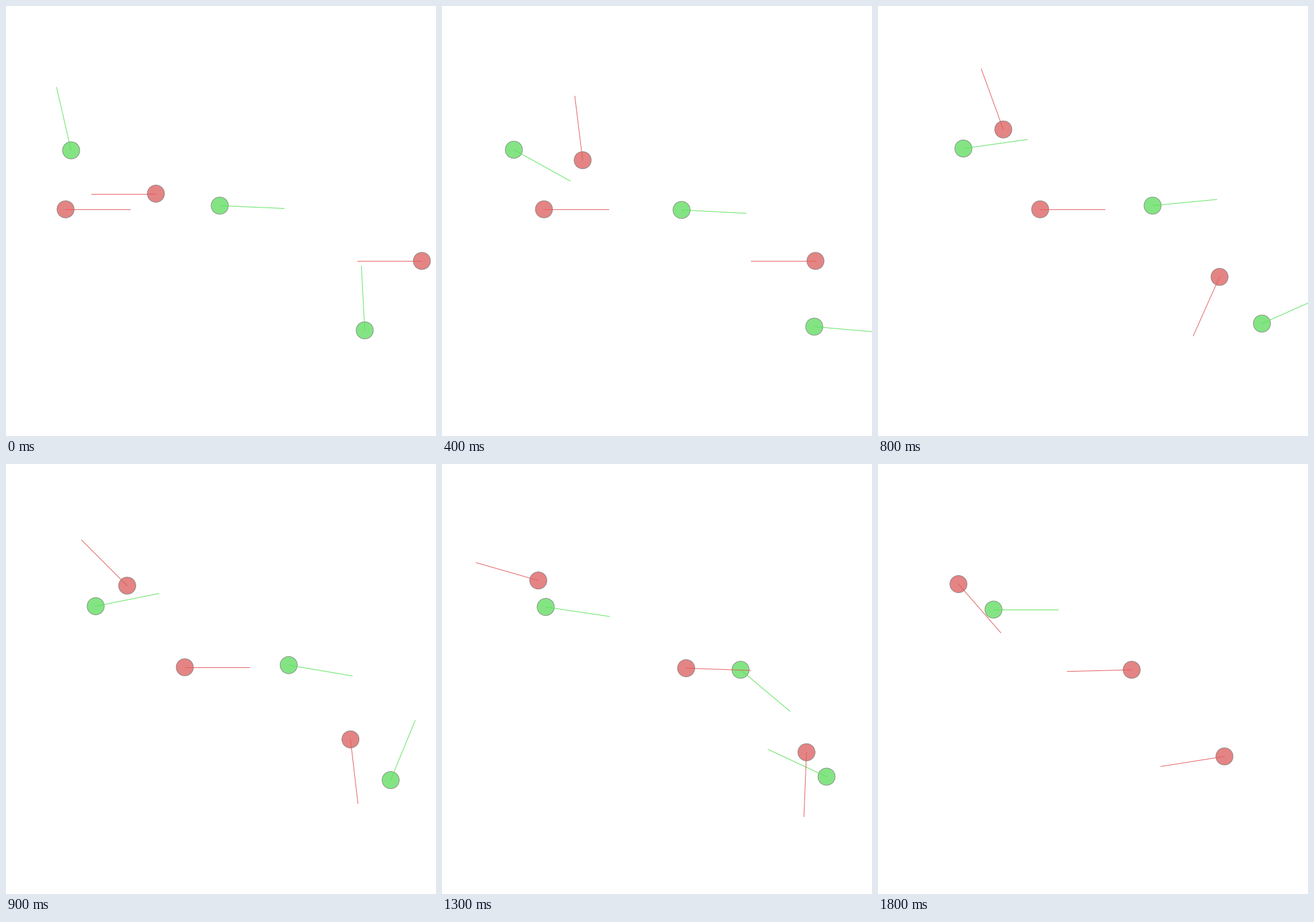
A matplotlib script that plays this animation: 700x700 px, repeating every 1.9 s.

```python
import numpy as np
import matplotlib.pyplot as plt
from matplotlib.animation import FuncAnimation
from matplotlib.patches import Circle

SIZE, DPI = 700, 100
PX = 72 / DPI
FRAMES, INTERVAL = 19, 100
RADIUS, REACH = 14, 105
CAUGHT = 13  # last frame in which the caught prey are seen

PREY = ("#84e484", "#5ce25c")
HUNTER = ("#e48484", "#e25c5c")

# Poses (x, y, heading) at shared beats; headings in degrees, clockwise on screen.
BEATS = np.array([0, 4, 8, 11, 15, 18])
AGENTS = [
    (PREY, [(106, 235, -103), (117, 234, 29), (139, 232, -8),
            (160, 231, -18), (176, 235, 35), (188, 237, 0)]),
    (PREY, [(348, 325, 2.5), (390, 332, 3), (447, 325, -5.5), (486, 335, 40)]),
    (PREY, [(584, 528, -93), (606, 522, 5), (625, 517, -24), (626, 509, -155)]),
    (HUNTER, [(244, 305.5, 180), (229, 251, 263), (204, 201, 250),
              (182, 198, 175), (135, 184, 217), (131, 195.5, 49)]),
    (HUNTER, [(97, 331, 0), (166, 331, 0), (264, 331, 0),
              (345, 331, 0), (431, 334, 4), (413, 335, 178.5)]),
    (HUNTER, [(677, 415, 180), (608, 415, 180), (556, 441, 114),
              (581, 462, 22), (595, 473, 162.5), (564, 476, 171)]),
]


def glide(t, v, frame):
    """Smooth cubic path through the values v at the times t."""
    slope = np.gradient(v, t)
    i = min(np.searchsorted(t, frame, side="right"), len(t) - 1) - 1
    h = t[i + 1] - t[i]
    s = min((frame - t[i]) / h, 1)
    ease = s * s * (3 - 2 * s)
    bend = s * (1 - s) * h * (slope[i] * (1 - s) - slope[i + 1] * s)
    return v[i] + (v[i + 1] - v[i]) * ease + bend


def pose(poses, frame):
    t = BEATS[:len(poses)]
    x, y, heading = np.array(poses, float).T
    angle = np.radians(np.interp(frame, t, heading))
    return glide(t, x, frame), glide(t, y, frame), angle


fig = plt.figure(figsize=(SIZE / DPI, SIZE / DPI), dpi=DPI, facecolor="white")
ax = fig.add_axes([0, 0, 1, 1])
ax.set_xlim(0, SIZE)
ax.set_ylim(SIZE, 0)
ax.axis("off")

parts = []
for (fill, stroke), _ in AGENTS:
    body = ax.add_patch(Circle((0, 0), RADIUS, facecolor=fill, edgecolor="#7c7c7c",
                               linewidth=0.8 * PX, zorder=2))
    ray, = ax.plot([], [], color=stroke, linewidth=PX, zorder=3)
    parts.append((body, ray))


def draw(frame):
    for (body, ray), (_, poses) in zip(parts, AGENTS):
        x, y, angle = pose(poses, frame)
        body.center = x, y
        ray.set_data([x, x + REACH * np.cos(angle)], [y, y + REACH * np.sin(angle)])
        alive = len(poses) == len(BEATS) or frame <= CAUGHT
        body.set_visible(alive)
        ray.set_visible(alive)
    return [p for pair in parts for p in pair]


anim = FuncAnimation(fig, draw, frames=FRAMES, interval=INTERVAL,
                     repeat=True, repeat_delay=0, blit=False)
plt.show()
```
